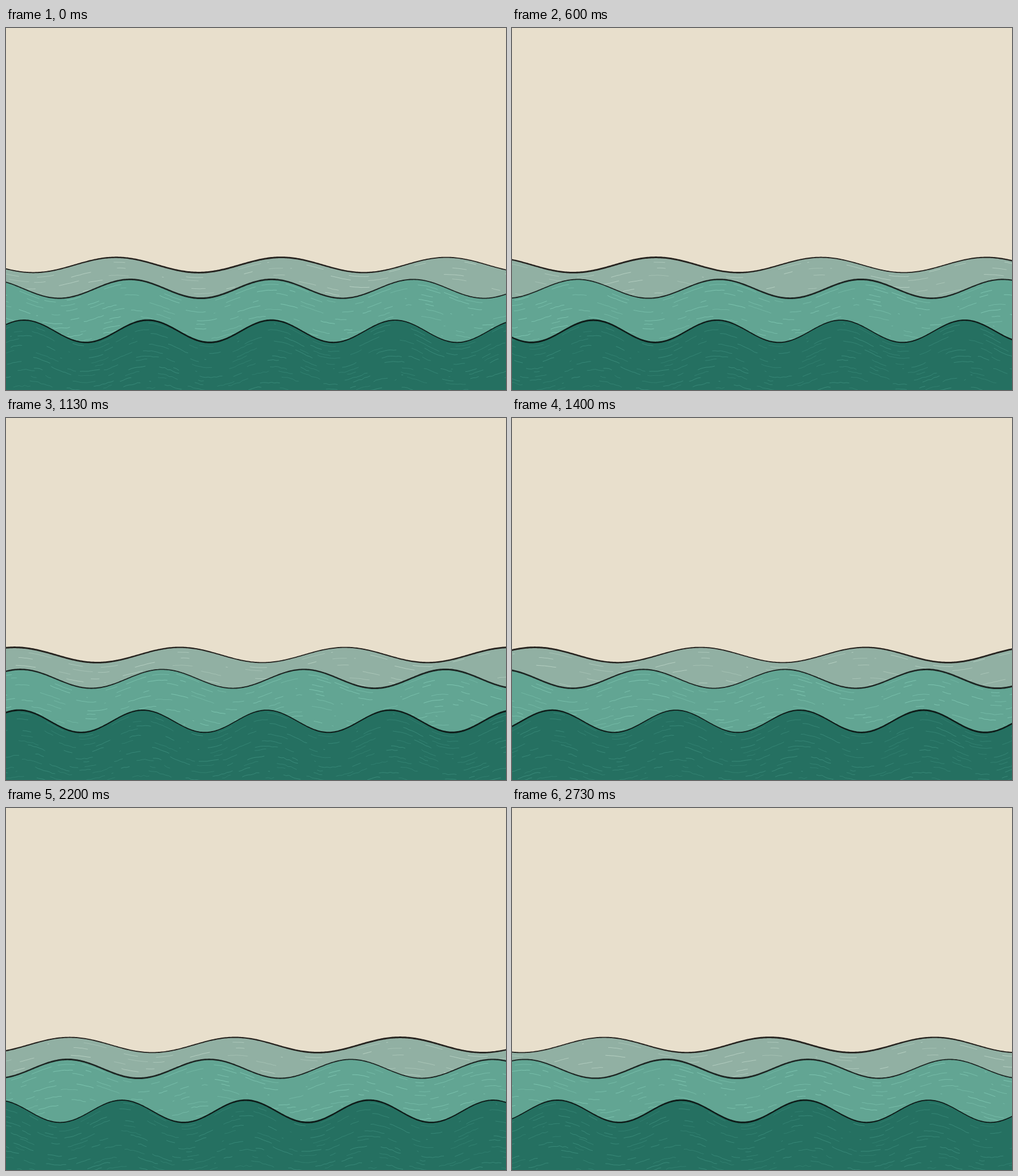
Recreate the animation shown at these times as an HTML page with a canvas. Size 879 by 637 pixels, loop 2.86 s.

```html
<!DOCTYPE html>
<html lang="en">
<head>
<meta charset="utf-8">
<title>Waves</title>
<style>
html, body { margin: 0; width: 100%; height: 100%; overflow: hidden; background: #e8dfcc; }
canvas { display: block; }
</style>
</head>
<body>
<canvas id="sea" width="879" height="637"></canvas>
<script>
const W = 879, H = 637, LOOP = 2860, TAU = Math.PI * 2;
const ctx = document.getElementById('sea').getContext('2d');

// Moments at which a new pose is shown
const steps = [0, 130, 200, 270, 330, 400, 470, 600, 730, 800, 870, 1000, 1130,
  1270, 1330, 1400, 1600, 1730, 1870, 1930, 2070, 2200, 2270, 2400, 2530, 2730];
// Drift progress over time: [ms, progress]
const drift = [[0, 0], [400, .1345], [870, .302], [1400, .474], [1730, .584],
  [2200, .72], [2730, .893]];

const layers = [
  { y: 417, amp: 13.4, len: 290.4, crest: 193.3, travel: 290.4, fill: '#91b0a3',
    ink: '#26231f', hatch: 'rgba(205,228,214,.62)', rows: 6, gap: 10.5, space: 85,
    rough: .25, thin: 840, thinMove: -860 },
  { y: 459, amp: 16.6, len: 249, crest: 218, travel: -498, fill: '#62a593',
    ink: '#1d2623', hatch: 'rgba(146,220,198,.58)', rows: 11, gap: 8.6, space: 56,
    rough: .5, thin: -85, thinMove: 1000 },
  { y: 533.7, amp: 19.6, len: 217.5, crest: 31.7, travel: 541, fill: '#257061',
    ink: '#0e1b18', hatch: 'rgba(82,168,150,.48)', rows: 15, gap: 8.4, space: 50,
    rough: .7, thin: 780, thinMove: -960 }
];

function seeded(s) {
  return () => {
    s = (s * 1664525 + 1013904223) >>> 0;
    return s / 4294967296;
  };
}

// Short pen strokes, placed relative to the moving wave
function makeStrokes(l, seed) {
  const rnd = seeded(seed), list = [];
  for (let r = 0; r < l.rows; r++) {
    let x = -600 + rnd() * 60;
    while (x < W + 520) {
      const depth = 7 + r * l.gap + (rnd() - .5) * 5;
      const long = rnd() < .1 ? 3 : 14 + rnd() * 28;
      const wobble = l.rough * (.6 + r / l.rows * 1.4);
      const pts = [];
      for (let d = 0; d <= long; d += Math.min(5, long))
        pts.push([x + d, depth + (rnd() - .5) * 2 * wobble]);
      list.push({ pts, fade: .5 + rnd() * .5 });
      x += long + 6 + rnd() * l.space * 1.3;
    }
  }
  return list;
}
layers.forEach((l, i) => l.strokes = makeStrokes(l, 41 + i * 977));

function progress(t) {
  for (let i = 1; i < drift.length; i++) {
    const [a, p] = drift[i - 1], [b, q] = drift[i];
    if (t <= b) return p + (q - p) * (t - a) / (b - a);
  }
  return drift[drift.length - 1][1];
}

function drawLayer(l, p) {
  const shift = l.travel * p;
  const swell = x => Math.cos((x - l.crest - shift) / l.len * TAU) * l.amp;
  const edge = x => l.y - swell(x);
  const half = x => 1.2 - .3 * Math.cos((x - l.thin - l.thinMove * p) / 900 * TAU);

  ctx.beginPath();
  ctx.moveTo(-4, H);
  for (let x = -4; x <= W + 4; x += 2) ctx.lineTo(x, edge(x));
  ctx.lineTo(W + 4, H);
  ctx.fillStyle = l.fill;
  ctx.fill();

  ctx.strokeStyle = l.hatch;
  ctx.lineWidth = 1;
  for (const s of l.strokes) {
    ctx.globalAlpha = s.fade;
    ctx.beginPath();
    for (const [px, depth] of s.pts) {
      const x = px + shift;
      ctx.lineTo(x, l.y + depth - swell(x) * (1 - depth * .004));
    }
    ctx.stroke();
  }
  ctx.globalAlpha = 1;

  // Outline with a slowly changing pen pressure
  ctx.beginPath();
  for (let x = -4; x <= W + 4; x += 2) ctx.lineTo(x, edge(x) - half(x));
  for (let x = W + 4; x >= -4; x -= 2) ctx.lineTo(x, edge(x) + half(x));
  ctx.fillStyle = l.ink;
  ctx.fill();
}

function draw(t) {
  const p = progress(t);
  ctx.fillStyle = '#e8dfcc';
  ctx.fillRect(0, 0, W, H);
  layers.forEach(l => drawLayer(l, p));
}

let start = null, shown = -1;
function tick() {
  const now = performance.now();
  if (start === null) start = now;
  const t = (now - start) % LOOP;
  const step = steps.filter(s => s <= t).pop();
  if (step !== shown) draw(shown = step);
  requestAnimationFrame(tick);
}
tick();
</script>
</body>
</html>
```
